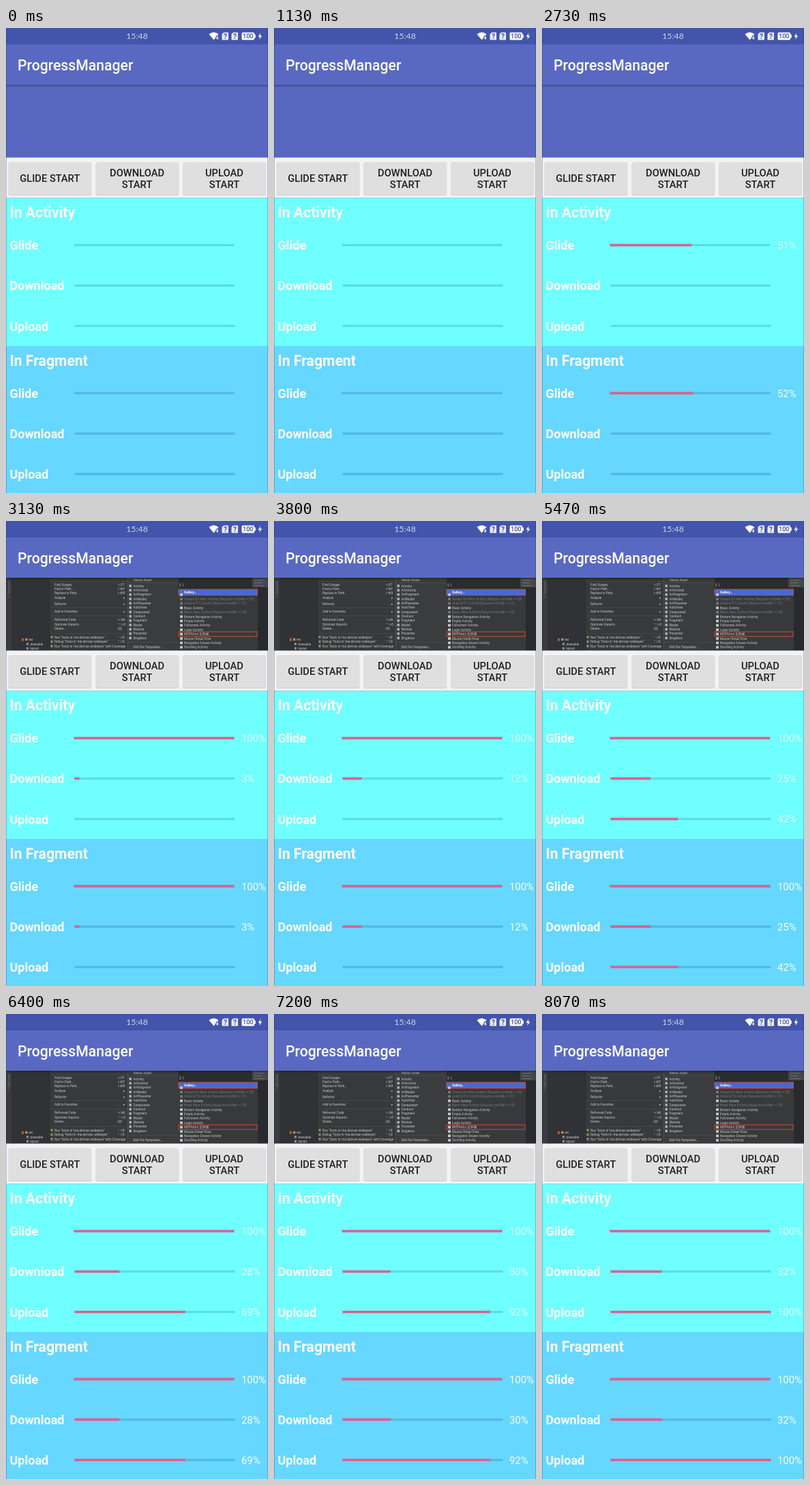
An HTML page for the animation above (8140 ms loop, 384 px wide and 680 px high).

```html
<!DOCTYPE html>
<html lang="en">
<head>
<meta charset="utf-8">
<title>ProgressManager</title>
<style>
html, body { margin: 0; width: 100%; height: 100%; overflow: hidden; background: #5868c0; }
svg { display: block; width: 100%; height: 100%; font-family: Roboto, sans-serif; }
text { white-space: pre; }
.tiny { font-size: 4.7px; fill: #c9c9ca; }
.dim { fill: #77777a; }
.button { font-size: 14.7px; font-weight: 500; fill: #202020; text-anchor: middle; }
.label { font-size: 18px; font-weight: 700; fill: #fff; }
.head { font-size: 21.2px; font-weight: 700; fill: #fff; }
.percent { font-size: 14.9px; fill: #fff; }
</style>
</head>
<body>
<svg id="stage" viewBox="0 0 384 680" preserveAspectRatio="none">
  <defs>
    <linearGradient id="shade" x2="0" y2="1">
      <stop offset="0" stop-color="#000" stop-opacity=".3"/>
      <stop offset="1" stop-color="#000" stop-opacity="0"/>
    </linearGradient>
    <clipPath id="photoClip"><rect y="83" width="384" height="106.5"/></clipPath>
  </defs>
</svg>
<script>
const LOOP = 8140, STEP = 200 / 3;
const stage = document.getElementById('stage');

function add(parent, tag, attrs, content) {
  const el = document.createElementNS('http://www.w3.org/2000/svg', tag);
  for (const key in attrs) el.setAttribute(key, attrs[key]);
  if (content !== undefined) el.textContent = content;
  parent.appendChild(el);
  return el;
}
const box = (parent, x, y, width, height, fill, more) =>
  add(parent, 'rect', { x, y, width, height, fill, ...more });
const write = (parent, x, y, content, cls, more) =>
  add(parent, 'text', { x, y, class: cls, ...more }, content);

function drawStatusBar() {
  box(stage, 0, 0, 384, 24, '#4255aa');
  write(stage, 192, 16.3, '15:48', '', {
    'text-anchor': 'middle', 'font-size': 12.3, fill: '#ccd2ec', 'font-family': 'Lato, sans-serif'
  });
  add(stage, 'path', { d: 'M297.5 9Q304.5 3.5 311.5 9L304.5 17.5Z', fill: '#fff' });
  box(stage, 308, 12, 3.5, 5, '#dfe3f4', { stroke: '#4255aa', 'stroke-width': 1 });
  for (const x of [316.5, 330.5]) {
    add(stage, 'path', { d: `M${x + 2.5} 6.5h7v11h-9.5v-8.5z`, fill: '#e9ecf8' });
    write(stage, x + 5, 15.7, '?', '', {
      'text-anchor': 'middle', 'font-size': 10, 'font-weight': 700, fill: '#4255aa'
    });
  }
  box(stage, 345.5, 6.5, 18.5, 11, '#fff', { rx: 1.5 });
  box(stage, 364, 9.5, 1.8, 5, '#fff');
  write(stage, 354.8, 15.2, '100', '', {
    'text-anchor': 'middle', 'font-size': 9, 'font-weight': 500, fill: '#35468f'
  });
  add(stage, 'path', { d: 'M373.5 7l-4 5.8h2.6l-1 4.2 4.2-5.8h-2.8z', fill: '#fff' });
}

function drawList(group, x, top, gap, lines, cls) {
  lines.forEach((line, i) => {
    if (line) write(group, x, top + i * gap + 1.6, line, cls || 'tiny');
  });
}

function drawPhoto() {
  const g = add(stage, 'g', { 'clip-path': 'url(#photoClip)' });
  box(g, 0, 83, 384, 107, '#2b2c2f');
  box(g, 0, 83, 8, 107, '#3a3b3e');
  box(g, 8, 83, 57, 107, '#303235');
  write(g, 0, 0, '1: Structure', 'tiny dim', { transform: 'translate(5.5 112) rotate(-90)' });

  // Project tree
  drawList(g, 33, 173.5, 6.4, ['res', '  drawable', '  layout']);
  box(g, 23, 171.5, 3, 4, '#b45e40');
  box(g, 28, 171.5, 3.5, 3.5, '#b08a52');
  box(g, 30, 178, 3, 3.5, '#8d8d90');
  box(g, 30, 184.5, 3, 3.5, '#8d8d90');

  // Context menu
  box(g, 65, 83, 113, 107, '#38393b');
  for (const y of [88.5, 126.5, 138.5, 164]) box(g, 65, y, 113, 0.6, '#505154');
  drawList(g, 71, 93, 6.4, ['Find Usages', 'Find in Path...', 'Replace in Path...', 'Analyze']);
  drawList(g, 71, 121, 11.5, ['Refactor', 'Add to Favorites']);
  drawList(g, 71, 144.5, 6.5, ['Reformat Code', 'Optimize Imports', 'Delete...']);
  drawList(g, 71, 170, 6.6, ["Run 'Tests in 'me.dorivan.wideeyes''",
    "Debug 'Tests in 'me.dorivan.wideeyes''", "Run 'Tests in 'me.dorivan.wideeyes'' with Coverage"]);
  drawList(g, 163, 93, 6.4, ['⌥F7', '⇧⌘F', '⇧⌘R']);
  drawList(g, 163, 144.5, 6.5, ['⌥⌘L', '⌃⌥O', '⌫']);
  drawList(g, 163, 170, 6.6, ['⌃⇧R', '⌃⇧D']);
  for (const y of [112, 121, 132.5]) write(g, 172, y + 1.6, '▸', 'tiny');
  for (const [y, color] of [[168, '#6fa15e'], [174.6, '#6fa15e'], [181.2, '#829585']])
    box(g, 65.5, y, 3, 3.5, color);

  // File types
  box(g, 178, 83, 75, 107, '#3b3c3e');
  box(g, 178, 83, 0.7, 107, '#58595b');
  const kinds = ['Activity', 'ArtActivity', 'ArtFragment', 'ArtModel', 'ArtPresenter', 'AutoView',
    'Component', 'Contract', 'Fragment', 'Model', 'Module', 'Presenter', 'Singleton'];
  write(g, 186.5, 87.6, 'Vector Asset', 'tiny');
  drawList(g, 186.5, 95, 6.35, kinds);
  kinds.forEach((_, i) => box(g, 180.5, 93 + i * 6.35, 3.5, 3.8, '#a9adb1'));
  write(g, 186.5, 185.6, 'Edit File Templates...', 'tiny');
  box(g, 178, 90, 75, 0.6, '#505154');
  box(g, 178, 177, 75, 0.6, '#505154');

  // Activity templates
  write(g, 254, 94.5, '$  {', 'tiny');
  box(g, 253, 99, 116, 91, '#38393b');
  box(g, 253, 100, 115.5, 8.6, '#4668d8', { stroke: '#c64a45', 'stroke-width': 1 });
  write(g, 261, 106.2, 'Gallery...', 'tiny', { style: 'fill:#fff;font-weight:700' });
  const grey = ['Always On Wear Activity (Requires minSdk >= 20)',
    'Android TV Activity (Requires minSdk >= 21)', '',
    'Blank Wear Activity (Requires minSdk >= 20)'];
  drawList(g, 261, 114.3, 6.4, grey, 'tiny dim');
  drawList(g, 261, 127.1, 6.4, ['Basic Activity', '', 'Bottom Navigation Activity', 'Empty Activity',
    'Fullscreen Activity', 'Login Activity', 'MVPArms 全家桶', 'Master/Detail Flow',
    'Navigation Drawer Activity', 'Scrolling Activity']);
  for (let i = -1; i < 12; i++)
    box(g, 255, 112.3 + i * 6.4, 4, 3.8, i === 0 || i === 1 || i === 3 ? '#737477' : '#c1c3c6');
  box(g, 253, 162, 115, 6.8, 'none', { stroke: '#b94f37', 'stroke-width': 1.1 });

  // Side panel
  box(g, 361, 83, 23, 14, '#46484b');
  for (const y of [86, 90, 94]) box(g, 364, y, y === 90 ? 11 : 14, 1, '#6b6d70');
  box(g, 369, 97, 15, 93, '#292a2d');
  return g;
}

function drawButton(x, lines) {
  box(stage, x - 0.5, 197, 122, 48, '#000', { rx: 2.5, opacity: 0.12 });
  box(stage, x, 196, 121, 47.5, '#dfdfe0', { rx: 2 });
  const first = lines.length > 1 ? 217 : 225;
  lines.forEach((line, i) => write(stage, x + 60.3, first + i * 17, line, 'button'));
}

function makeRow(name, x, y, track, alpha) {
  write(stage, 5.5, y + 6.8, name, 'label');
  box(stage, x, y - 1.6, 235, 3.2, track);
  const bar = box(stage, x, y - 1.8, 0, 3.6, '#dc628f');
  const label = write(stage, 345, y + 5.5, '', 'percent', { 'fill-opacity': alpha });
  return value => {
    bar.setAttribute('width', 2.35 * value);
    label.textContent = value ? value + '%' : '';
  };
}

function makePanel(title, top, height, fill, track, alpha) {
  box(stage, 0, top, 384, height, fill);
  write(stage, 5.5, top + 28.5, title, 'head');
  return ['Glide', 'Download', 'Upload'].map((name, i) =>
    makeRow(name, i ? 100.5 : 99.5, top + 69 + i * 59.1, track, alpha));
}

drawStatusBar();
box(stage, 0, 83, 384, 107, '#5868c0');
const photo = drawPhoto();
box(stage, 0, 24, 384, 59, '#5969c1');
box(stage, 0, 83, 384, 4, 'url(#shade)');
write(stage, 17, 62, 'ProgressManager', '', { 'font-size': 21.2, 'font-weight': 500, fill: '#fff' });
box(stage, 0, 189.5, 384, 59, '#f3f3f4');
drawButton(4, ['GLIDE START']);
drawButton(131.8, ['DOWNLOAD', 'START']);
drawButton(259.6, ['UPLOAD', 'START']);
const panels = [
  makePanel('In Activity', 248.5, 216.5, '#70ffff', '#5adde3', 0.78),
  makePanel('In Fragment', 465, 215, '#66d7ff', '#52b8df', 0.96)
];
for (const x of [0, 383.3]) box(stage, x, 0, 0.7, 680, '#18345c', { opacity: 0.4 });

// [time in ms, percent]
const tracks = [
  [[2330, 0], [2730, 51.5], [3060, 100]],
  [[2910, 0], [3130, 3.5], [4530, 22.5], [6400, 28.5], [8060, 32.5]],
  [[4010, 0], [4530, 15.5], [6400, 69.5], [7450, 100]]
];

function valueAt(keys, t) {
  if (t <= keys[0][0]) return 0;
  for (let i = 1; i < keys.length; i++) {
    const [t0, a] = keys[i - 1], [t1, b] = keys[i];
    if (t <= t1) return Math.floor(a + (b - a) * (t - t0) / (t1 - t0));
  }
  return Math.floor(keys[keys.length - 1][1]);
}

function render(now) {
  const t = Math.floor((now % LOOP + 4) / STEP) * STEP;
  tracks.forEach((keys, i) => {
    const value = valueAt(keys, t);
    panels[0][i](value);
    const lead = i === 0 && value > 0 && value < 100 ? 1 : 0;
    panels[1][i](value + lead);
  });
  photo.style.display = t >= 3060 ? '' : 'none';
}

const start = performance.now();
function tick() {
  render(performance.now() - start);
  requestAnimationFrame(tick);
}
tick();
</script>
</body>
</html>
```
